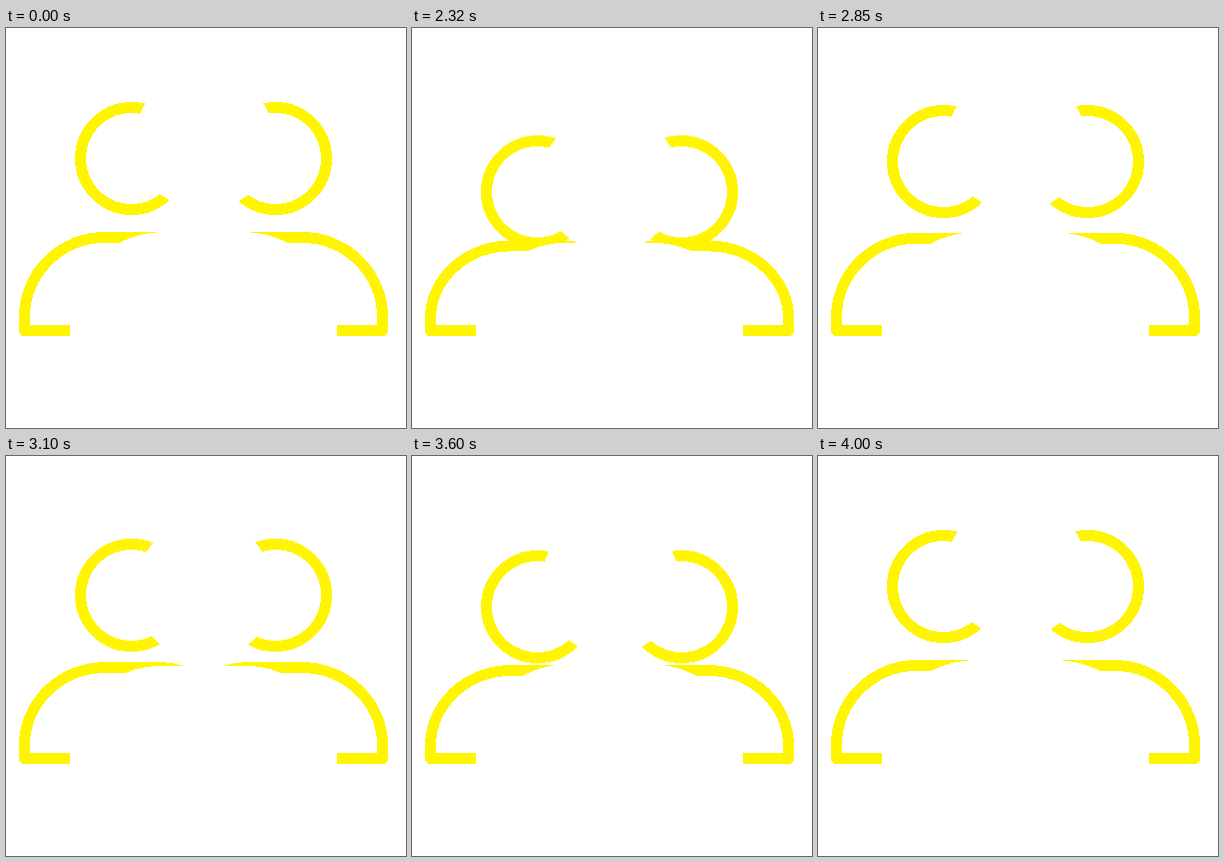
Recreate the animation shown at these times as an HTML page without scripts. Size 400 px wide and 400 px high, loop 4.02 s.

```html
<!DOCTYPE html>
<html lang="en">
<head>
<meta charset="utf-8">
<title>Group</title>
<style>
  html, body { margin: 0; width: 100%; height: 100%; overflow: hidden; background: #fff; }
  svg { display: block; width: 100%; height: 100%; shape-rendering: crispEdges; }

  .back { fill: none; stroke: #fff500; stroke-width: 11; stroke-linejoin: round; }
  .front { fill: #fff; }

  .back .head { animation: back-head 4020ms infinite; }
  .back .body { animation: back-body 4020ms infinite; }
  .front .head { animation: front-head 4020ms infinite; }
  .front .body { animation: front-body 4020ms infinite; }

  /* Two nods after a long rest; the front person leads the others. */
  @keyframes back-head {
    0%, 49.68%, 73.95% { transform: translateY(0); animation-timing-function: cubic-bezier(.37, 0, .63, 1); }
    59.63% { transform: translateY(36.5px); animation-timing-function: cubic-bezier(.3, 0, .58, 1); }
    83.75% { transform: translateY(36.5px); animation-timing-function: cubic-bezier(.25, 0, .5, 1); }
    99.43%, 100% { transform: translateY(0); }
  }
  @keyframes back-body {
    0%, 49.68%, 73.95% {
      d: path("M70 302.5H18.5V289.5A80 80 0 0 1 98.5 209.5H152.5A80 80 0 0 1 232.5 289.5");
      animation-timing-function: cubic-bezier(.37, 0, .63, 1);
    }
    59.63% {
      d: path("M70 302.5H18.5V290.8A80 72.1 0 0 1 98.5 218.7H152.5A80 72.1 0 0 1 232.5 290.8");
      animation-timing-function: cubic-bezier(.3, 0, .58, 1);
    }
    83.75% {
      d: path("M70 302.5H18.5V290.8A80 72.1 0 0 1 98.5 218.7H152.5A80 72.1 0 0 1 232.5 290.8");
      animation-timing-function: cubic-bezier(.25, 0, .5, 1);
    }
    99.43%, 100% {
      d: path("M70 302.5H18.5V289.5A80 80 0 0 1 98.5 209.5H152.5A80 80 0 0 1 232.5 289.5");
    }
  }
  @keyframes front-head {
    0%, 49.68%, 73.68% { transform: translateY(0); animation-timing-function: cubic-bezier(.37, 0, .63, 1); }
    56.39% { transform: translateY(42px); animation-timing-function: cubic-bezier(.37, 0, .5, 1); }
    80.4% { transform: translateY(42px); animation-timing-function: cubic-bezier(.35, 0, .42, 1); }
    99.43%, 100% { transform: translateY(0); }
  }
  @keyframes front-body {
    0%, 49.68%, 73.68% {
      d: path("M64 320V296.7A92.5 92.5 0 0 1 156.5 204.2H238.5A92.5 92.5 0 0 1 331 296.7V320Z");
      animation-timing-function: cubic-bezier(.37, 0, .63, 1);
    }
    56.39% {
      d: path("M64 320V297.3A92.5 82.6 0 0 1 156.5 214.7H238.5A92.5 82.6 0 0 1 331 297.3V320Z");
      animation-timing-function: cubic-bezier(.37, 0, .5, 1);
    }
    80.4% {
      d: path("M64 320V297.3A92.5 82.6 0 0 1 156.5 214.7H238.5A92.5 82.6 0 0 1 331 297.3V320Z");
      animation-timing-function: cubic-bezier(.35, 0, .42, 1);
    }
    99.43%, 100% {
      d: path("M64 320V296.7A92.5 92.5 0 0 1 156.5 204.2H238.5A92.5 92.5 0 0 1 331 296.7V320Z");
    }
  }
</style>
</head>
<body>
<svg viewBox="0 0 400 400">
  <g class="back">
    <path class="body" d="M70 302.5H18.5V289.5A80 80 0 0 1 98.5 209.5H152.5A80 80 0 0 1 232.5 289.5"/>
    <circle class="head" cx="125.5" cy="130.5" r="51"/>
  </g>
  <g class="back" transform="translate(395) scale(-1 1)">
    <path class="body" d="M70 302.5H18.5V289.5A80 80 0 0 1 98.5 209.5H152.5A80 80 0 0 1 232.5 289.5"/>
    <circle class="head" cx="125.5" cy="130.5" r="51"/>
  </g>
  <g class="front">
    <path class="body" d="M64 320V296.7A92.5 92.5 0 0 1 156.5 204.2H238.5A92.5 92.5 0 0 1 331 296.7V320Z"/>
    <circle class="head" cx="198.4" cy="112.4" r="69.7"/>
  </g>
</svg>
</body>
</html>
```
